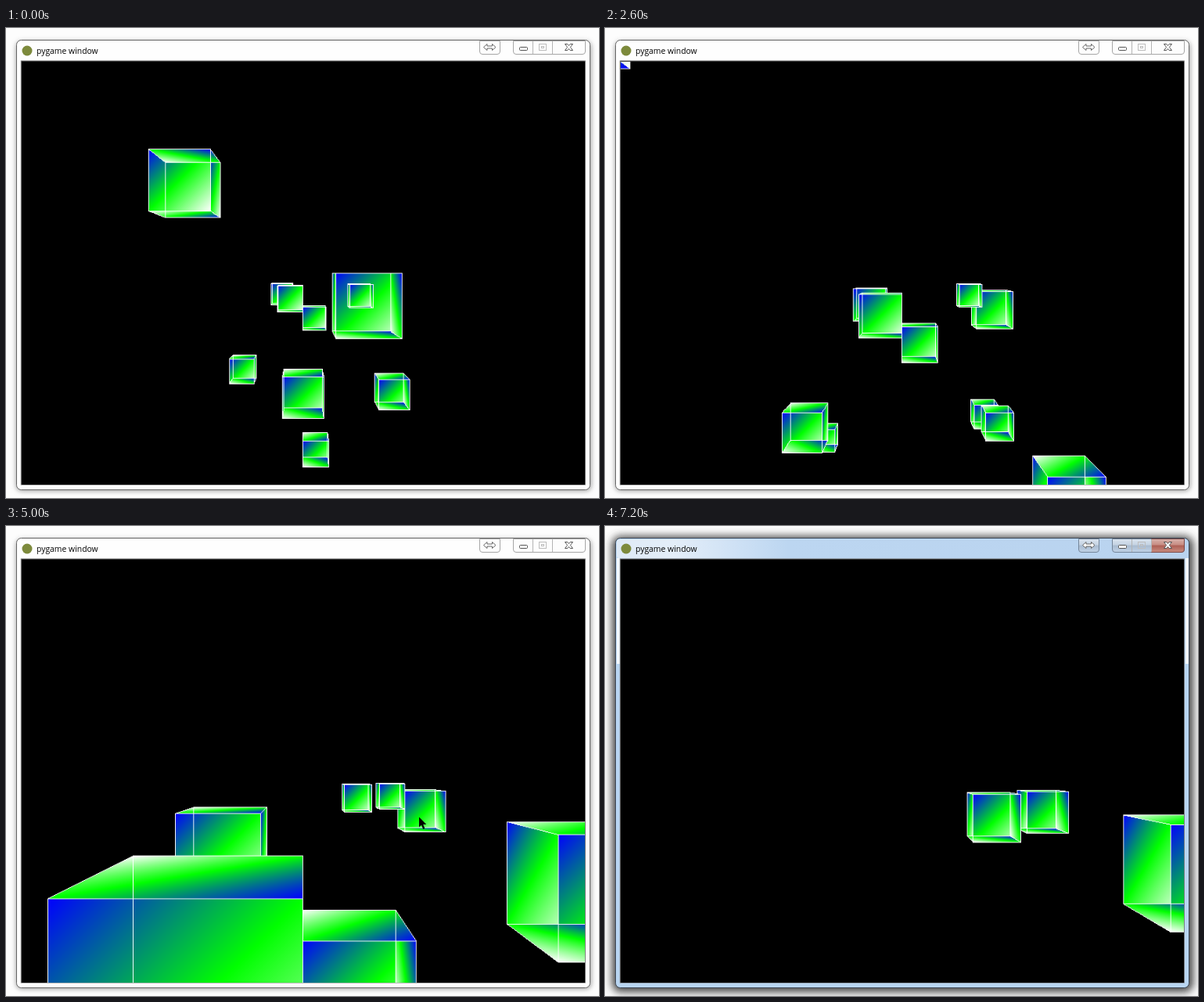
An HTML page with a canvas for the animation above (7.4 s loop, 758x600 px).

```html
<!DOCTYPE html>
<html lang="en">
<head>
<meta charset="utf-8">
<title>pygame window</title>
<style>
html, body { margin: 0; width: 100%; height: 100%; overflow: hidden; background: #fdfdfd; }
#stage { position: relative; width: 758px; height: 600px; overflow: hidden; }
svg, canvas { position: absolute; left: 0; top: 0; display: block; }
#view { left: 20px; top: 42px; }
text { font: 10.4px "Open Sans", "Noto Sans", sans-serif; fill: #000; }
</style>
</head>
<body>
<div id="stage">
  <svg width="758" height="600" viewBox="0 0 758 600">
    <defs>
      <filter id="soft" x="-10%" y="-10%" width="120%" height="120%"><feGaussianBlur stdDeviation="3"/></filter>
      <filter id="deep" x="-10%" y="-10%" width="120%" height="120%"><feGaussianBlur stdDeviation="5.5"/></filter>
      <filter id="glow" x="-100%" y="-100%" width="300%" height="300%"><feGaussianBlur stdDeviation="4"/></filter>
      <linearGradient id="bar">
        <stop offset="0" stop-color="#dfeaf6"/><stop offset=".1" stop-color="#e4eef9"/>
        <stop offset=".3" stop-color="#bcd6f1"/><stop offset="1" stop-color="#b9d3ef"/>
      </linearGradient>
      <linearGradient id="steel" x2="0" y2="1">
        <stop offset="0" stop-color="#dbe5f0"/><stop offset=".45" stop-color="#c4d2e2"/>
        <stop offset=".5" stop-color="#a9bbd0"/><stop offset="1" stop-color="#c0d2e6"/>
      </linearGradient>
      <linearGradient id="red" x2="0" y2="1">
        <stop offset="0" stop-color="#d9b3ad"/><stop offset=".45" stop-color="#c78c82"/>
        <stop offset=".5" stop-color="#ad5f55"/><stop offset="1" stop-color="#c98d80"/>
      </linearGradient>
    </defs>
    <rect id="shadow" x="13" y="17" width="735" height="574" rx="7"/>
    <rect id="frame" x="13.5" y="15.5" width="733" height="574" rx="6"/>
    <g id="tint">
      <rect x="15" y="17" width="730" height="24.500" rx="4" fill="url(#bar)"/>
      <path d="M15 41H19V176H15ZM742 41H746V176H742Z" fill="#f3f8fd"/>
    </g>
    <rect x="19.300" y="42" width="721" height="541" fill="#000" stroke="#777"/>
    <circle cx="27" cy="29" r="6.5" fill="#7d8a3c"/>
    <text x="39" y="33">pygame window</text>
    <g id="swap">
      <path class="btn" d="M605.5 16.5H631.5V30Q631.5 33.5 628 33.5H609Q605.5 33.5 605.5 30Z"/>
      <path d="M610.5 24.500L615 20.500V23H621.500V20.500L626 24.500L621.500 28.500V26H615V28.500Z" fill="#fff" stroke="#666"/>
    </g>
    <ellipse id="halo" cx="618" cy="26" rx="9" ry="5" fill="#c4f3fb" filter="url(#glow)"/>
    <path class="btn" d="M648.5 16.5H740.5V30Q740.5 33.500 737 33.500H652Q648.500 33.500 648.500 30Z"/>
    <path id="close" d="M698.5 16.5H740.5V30Q740.5 33.500 737 33.500H698.5Z" fill="url(#red)" stroke="#7c4a48"/>
    <path d="M673.5 17V33M698.5 17V33" stroke="#b4b4b4"/>
    <rect x="656.500" y="24.500" width="10" height="4" rx="1" fill="#fff" stroke="#555"/>
    <g fill="none" stroke="#bdbdbd"><rect x="681.500" y="20.500" width="9" height="8"/><rect x="684.500" y="23.500" width="3" height="2"/></g>
    <path d="M714.500 20.500H717.800L719.500 22.500L721.200 20.500H724.500L721.400 24.500L724.500 28.500H721.200L719.500 26.500L717.800 28.500H714.500L717.600 24.500Z" fill="#fff" stroke="#555"/>
  </svg>
  <canvas id="view" width="720" height="541"></canvas>
  <svg width="758" height="600" viewBox="0 0 758 600">
    <path id="arrow" d="M0 0V13L3 10.300L5.200 15.500L7.400 14.500L5.200 9.500H9.300Z" fill="#000"/>
  </svg>
</div>
<script>
const LOOP = 7400, STEP = 200;
// The scene is 800 x 600 with a 45 degree lens, shown at nine tenths
const W = 800, H = 600, CX = 399.9, CY = 300, NEAR = 0.1, FAR = 50;
const FOCAL = H / 2 / Math.tan(Math.PI / 8);

const $ = id => document.getElementById(id);
const view = $('view').getContext('2d');
const scene = document.createElement('canvas');
scene.width = W;
scene.height = H;
const ctx = scene.getContext('2d');
const img = ctx.createImageData(W, H);
const px = new Uint32Array(img.data.buffer);

const VERTS = [[1,-1,-1],[1,1,-1],[-1,1,-1],[-1,-1,-1],[1,-1,1],[1,1,1],[-1,-1,1],[-1,1,1]];
const FACES = ['0123', '3276', '6754', '4510', '1572', '4036'];
const EDGES = ['01', '03', '04', '21', '23', '27', '63', '64', '67', '51', '54', '57'];

// centre x, centre y, starting distance of the near face; in painting order
const CUBES = [
  [-5,4,21.5], [-4,3,16.5], [-2,-2,47.5], [-1,-2,39.5], [1,-4,44.5], [2,-1,15.5],
  [5,-2,43.5], [7,-12,58.5], [7,-11,52.5], [6,-8,33.5], [0,-6,24.5], [1,-14,39.5],
  [-7,-15,61.5], [-5,-8,41.5], [6,-2,60.5], [7,-2,75.5], [4,-2,72.5]
];

// [step, value...] keys
const TRAVEL = [[0,0], [4,2.5], [9,10], [13,16], [21,29], [24,34], [29,41.5], [36,51]];
const POINTER = [[0,560,420], [4,548,430], [9,523,453], [13,535,440], [21,556,376], [29,500,367], [30,560,250], [36,600,230]];

function track(keys, n) {
  let i = 1;
  while (i < keys.length - 1 && n > keys[i][0]) i++;
  const a = keys[i - 1], b = keys[i], k = (n - a[0]) / (b[0] - a[0]);
  return a.slice(1).map((v, j) => v + (b[j + 1] - v) * k);
}

const dot = (a, b) => a[0] * b[0] + a[1] * b[1] + a[2] * b[2];
const sub = (a, b) => a.map((v, i) => v - b[i]);
const cross = (a, b) => [a[1]*b[2] - a[2]*b[1], a[2]*b[0] - a[0]*b[2], a[0]*b[1] - a[1]*b[0]];
const project = p => [CX + FOCAL * p[0] / p[2], CY + FOCAL * p[1] / p[2]];
const clamp = (v, hi) => Math.max(0, Math.min(hi, v));

// Green on one diagonal, blue and white on the other two corners
function shade(d) {
  const c = Math.round(255 * Math.abs(d));
  return d > 0 ? (255 << 24 | c << 16 | (255 - c) << 8) >>> 0 : (255 << 24 | c << 16 | 255 << 8 | c) >>> 0;
}

function fillFace(q) {
  let x0 = 0, x1 = W, y0 = 0, y1 = H;
  if (q.every(p => p[2] > NEAR)) {
    const s = q.map(project), xs = s.map(p => p[0]), ys = s.map(p => p[1]);
    x0 = clamp(Math.floor(Math.min(...xs)), W);
    x1 = clamp(Math.ceil(Math.max(...xs)), W);
    y0 = clamp(Math.floor(Math.min(...ys)), H);
    y1 = clamp(Math.ceil(Math.max(...ys)), H);
  }
  const a = q[0], b = sub(q[1], a), c = sub(q[3], a), n = cross(b, c);
  const an = dot(a, n), ab = dot(a, b), ac = dot(a, c);
  for (let y = y0; y < y1; y++) {
    const ry = (y + 0.5 - CY) / FOCAL;
    for (let x = x0; x < x1; x++) {
      const rx = (x + 0.5 - CX) / FOCAL;
      const z = an / (rx * n[0] + ry * n[1] + n[2]);
      if (!(z > NEAR && z < FAR)) continue;
      const u = (z * (rx * b[0] + ry * b[1] + b[2]) - ab) / 4;
      const v = (z * (rx * c[0] + ry * c[1] + c[2]) - ac) / 4;
      if (u >= 0 && u <= 1 && v >= 0 && v <= 1) px[y * W + x] = shade(u - v);
    }
  }
}

function drawEdge(p, q) {
  if (p[2] > q[2]) [p, q] = [q, p];
  if (q[2] < NEAR || p[2] > FAR) return;
  const at = z => p.map((v, i) => v + (q[i] - v) * (z - p[2]) / (q[2] - p[2]));
  const [ax, ay] = project(p[2] < NEAR ? at(NEAR) : p);
  const [bx, by] = project(q[2] > FAR ? at(FAR) : q);
  const len = Math.max(1, Math.ceil(Math.max(Math.abs(bx - ax), Math.abs(by - ay))));
  for (let i = 0; i <= len; i++) {
    const x = Math.floor(ax + (bx - ax) * i / len), y = Math.floor(ay + (by - ay) * i / len);
    if (x >= 0 && x < W && y >= 0 && y < H) px[y * W + x] = 0xffffffff;
  }
}

function drawCube([cx, cy, z0], travel) {
  const z = z0 - travel;
  if (z > FAR || z + 2 < NEAR) return;
  const pts = VERTS.map(v => [cx + v[0], -cy - v[1], z + 1 - v[2]]);
  const pick = s => [...s].map(i => pts[i]);
  FACES.forEach(f => fillFace(pick(f)));
  EDGES.forEach(e => drawEdge(...pick(e)));
}

function drawChrome(n) {
  const active = n >= 30, hidden = n === 28 || n === 29;
  const show = (id, on) => $(id).setAttribute('visibility', on ? 'visible' : 'hidden');
  const set = (el, attrs) => Object.keys(attrs).forEach(k => el.setAttribute(k, attrs[k]));
  show('tint', active);
  show('close', active);
  show('swap', !hidden);
  show('halo', hidden);
  set($('frame'), active ? { fill: '#b9d6f2', stroke: '#3c4654' } : { fill: '#fefefe', stroke: '#666' });
  set($('shadow'), active
    ? { fill: '#444', stroke: '#444', 'stroke-width': 8, filter: 'url(#deep)' }
    : { fill: '#999', stroke: 'none', 'stroke-width': 0, filter: 'url(#soft)' });
  document.querySelectorAll('.btn').forEach(b => set(b, active
    ? { fill: 'url(#steel)', stroke: '#75869a' }
    : { fill: '#fdfdfd', stroke: '#a6a6a6' }));
}

function draw(n) {
  const travel = Math.round(track(TRAVEL, n)[0] * 2) / 2;
  px.fill(0xff000000);
  CUBES.forEach(c => drawCube(c, travel));
  ctx.putImageData(img, 0, 0);
  view.clearRect(0, 0, 720, 541);
  view.imageSmoothingQuality = 'high';
  view.drawImage(scene, -0.2, 0.6, 720, 540);
  drawChrome(n);
  $('arrow').setAttribute('transform', `translate(${track(POINTER, n)})`);
}

const start = performance.now();
let last = -1;
function tick() {
  const n = Math.floor((performance.now() - start) % LOOP / STEP);
  if (n !== last) draw(last = n);
  requestAnimationFrame(tick);
}
tick();
</script>
</body>
</html>
```
